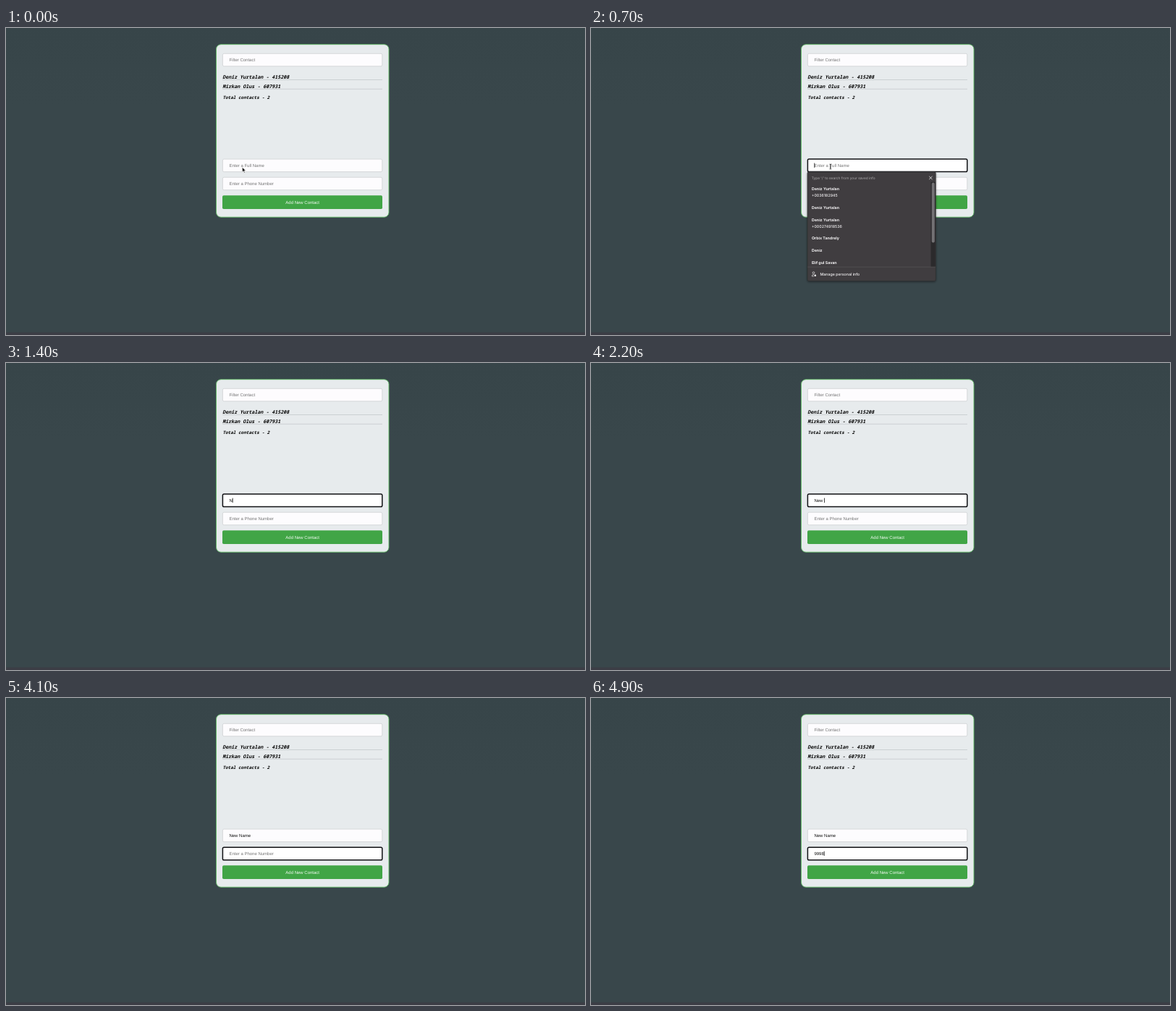
Animation, 800 px wide and 424 px high, one loop 5 s. Source, as an HTML page:

```html
<!DOCTYPE html>
<html lang="en">
<head>
<meta charset="utf-8">
<title>Contact form</title>
<style>
  html, body { margin: 0; width: 100%; height: 100%; overflow: hidden; background: #38464b; }
  svg { display: block; width: 100%; height: 100%; }
  text { text-rendering: geometricPrecision; white-space: pre; }
  .form { font: 6px "Liberation Sans", Arial, sans-serif; fill: #757575; }
  .typed { fill: #111; }
  .mono { font: italic 700 6.67px "Noto Sans Mono", "DejaVu Sans Mono", monospace; fill: #050505; }
  .total { font-size: 6px; }
  .ui { font: 500 5.3px Inter, sans-serif; fill: #f4f3f4; }
  .bold { font-weight: 700; }
  .hint { font-weight: 400; font-size: 4.8px; fill: #adabad; }
  .box { fill: #fdfcfe; stroke: #cbcdcf; stroke-width: .7; }
  .box.focus { fill: #fff; stroke: #101114; stroke-width: 1.5; }
</style>
</head>
<body>
<svg viewBox="0 0 800 424" preserveAspectRatio="none">
  <defs>
    <linearGradient id="back" x1="0" y1="0" x2="0" y2="1">
      <stop offset="0" stop-color="#374549"/>
      <stop offset=".25" stop-color="#39474b"/>
      <stop offset="1" stop-color="#39474b"/>
    </linearGradient>
    <filter id="shade" x="-10%" y="-10%" width="120%" height="125%">
      <feDropShadow dx="0" dy="1" stdDeviation="1.6" flood-color="#000" flood-opacity=".45"/>
    </filter>
  </defs>
  <rect width="800" height="424" fill="url(#back)"/>
  <rect y="420.5" width="800" height="3.5" fill="#3c3d45"/>
  <rect x="290.5" y="22.7" width="238.5" height="238.5" rx="6.5" fill="#e7ebed" stroke="#5fba64" stroke-width=".9"/>
  <g id="list"></g>
  <g id="fields"></g>
  <rect x="299" y="231.2" width="221" height="18.8" rx="1.8" fill="#41a546"/>
  <text class="form" x="409.7" y="242.5" text-anchor="middle" style="fill:#f4fbf4">Add New Contact</text>
  <rect id="caret" width=".8" height="6.4" fill="#111"/>
  <g id="popups"></g>
  <path id="arrow" d="M0 0V6.6L1.6 5.2L2.7 7.7L3.8 7.2L2.7 4.8H4.9Z" fill="#0b0b0b" stroke="#fff" stroke-width=".6" stroke-linejoin="round"/>
  <path id="beam" d="M-1.3 -3.3Q0 -3.3 0 -2.5Q0 -3.3 1.3 -3.3M0 -2.5V2.7M-1.3 3.5Q0 3.5 0 2.7Q0 3.5 1.3 3.5M-.7 1H.7" fill="none" stroke="#151515" stroke-width=".8"/>
</svg>
<script>
const $ = id => document.getElementById(id);

function add(parent, tag, attrs, content) {
  const el = document.createElementNS("http://www.w3.org/2000/svg", tag);
  for (const key in attrs) el.setAttribute(key, attrs[key]);
  if (content) el.textContent = content;
  parent.appendChild(el);
  return el;
}

const label = (parent, cls, x, y, content) => add(parent, "text", { class: cls, x, y }, content);
const show = (el, on) => el.setAttribute("visibility", on ? "visible" : "hidden");

function contact(y, content) {
  label($("list"), "mono", 299.3, y, content);
  add($("list"), "path", { d: `M299 ${y + 1.3}H520`, stroke: "#c0c5c8", "stroke-width": .7 });
}

function field(y, hint) {
  const box = add($("fields"), "rect", { class: "box", x: 299.4, y: y + .3, width: 220.4, height: 17.5, rx: 1.8 });
  const text = label($("fields"), "form", 308.4, y + 11.1, hint);
  return { y, hint, box, text };
}

// Rows are [baseline, text, bold]
function popup(top, height, rows, scrolls) {
  const g = add($("popups"), "g", {});
  const end = top + height;
  add(g, "rect", { x: 299, y: top, width: 177.3, height, rx: 2, fill: "#3f3d3f", stroke: "#29292b", "stroke-width": .5, filter: "url(#shade)" });
  label(g, "ui hint", 304.8, top + 10, "Type '/' to search from your saved info");
  add(g, "path", { d: `M467.2 ${top + 6.2}l4.3 4.3m0 -4.3l-4.3 4.3`, stroke: "#eee", "stroke-width": .8 });
  for (const [y, content, bold] of rows) label(g, bold ? "ui bold" : "ui", 304.9, y, content);
  if (scrolls) {
    add(g, "rect", { x: 469.6, y: top + 14, width: 6.2, height: end - top - 33.5, fill: "#2b2a2c" });
    add(g, "rect", { x: 470.8, y: top + 15, width: 4, height: 83, rx: 2, fill: "#737174" });
  }
  add(g, "path", { d: `M299.3 ${end - 19.3}H476`, stroke: "#5a585a", "stroke-width": .6 });
  const icon = add(g, "g", { transform: `translate(305 ${end - 13})`, fill: "none", stroke: "#e4e3e4", "stroke-width": .7 });
  add(icon, "circle", { cx: 2.5, cy: 1.7, r: 1.4 });
  add(icon, "path", { d: "M2.7 6.5H.4V5.5Q.4 4.2 2.9 4.2" });
  add(icon, "rect", { x: 3.5, y: 4.6, width: 2.5, height: 2, fill: "#e4e3e4", stroke: "none" });
  add(icon, "path", { d: "M4 4.7Q4.7 2.9 5.5 4.7" });
  label(g, "ui", 316.4, end - 7.7, "Manage personal info");
  return g;
}

const person = "Deniz Yurtalan", phoneA = "+0036182945", phoneB = "+000274918536";

contact(70.2, person + " - 415208");
contact(83, "Mirkan Olus - 607931");
label($("list"), "mono total", 299.4, 97.7, "Total contacts - 2");

field(35, "Filter Contact");
const nameField = field(180.8, "Enter a Full Name");
const phoneField = field(205.9, "Enter a Phone Number");

const namePopup = popup(198.6, 150.8, [
  [224.4, person, 1], [233.2, phoneA], [250, person, 1],
  [266.9, person, 1], [275.6, phoneB], [292.3, "Orbix Tandrely", 1],
  [309.1, "Deniz", 1], [325.9, "Elif gul Savan", 1]
], true);
const phonePopup = popup(223.7, 104.7, [
  [249.4, phoneA, 1], [258.3, person], [275, phoneB, 1],
  [283.9, person], [300.8, "00418263", 1]
]);

// Each entry: [start ms, value]
const nameSteps = [[0, ""], [1400, "N"], [1700, "Ne"], [2000, "New"], [2200, "New "],
  [2700, "New N"], [2800, "New Na"], [3000, "New Nam"], [3100, "New Name"]];
const phoneSteps = [[0, ""], [4400, "9"], [4600, "99"], [4700, "999"], [4900, "9998"]];
const mouseSteps = [[0, [326.4, 192.3]], [100, [328, 193.6]], [200, [329.7, 192.3]], [300, [330.9, 191.4]]];
const focusSteps = [[0, null], [700, nameField], [3600, phoneField]];

const at = (steps, t) => steps.filter(s => s[0] <= t).pop();

function fill(f, value, focused) {
  f.text.textContent = value || f.hint;
  f.text.setAttribute("class", value ? "form typed" : "form");
  f.box.setAttribute("class", focused ? "box focus" : "box");
}

function draw(t) {
  const [focusTime, focus] = at(focusSteps, t);
  const [nameTime, name] = at(nameSteps, t);
  const [phoneTime, phone] = at(phoneSteps, t);
  fill(nameField, name, focus === nameField);
  fill(phoneField, phone, focus === phoneField);

  // The caret blinks every half second, restarting on each key
  const since = t - Math.max(focusTime, nameTime, phoneTime);
  show($("caret"), focus && since % 1000 < 500);
  if (focus) {
    const value = focus === nameField ? name : phone;
    const width = value ? focus.text.getComputedTextLength() : 0;
    $("caret").setAttribute("x", 308.4 + width);
    $("caret").setAttribute("y", focus.y + 5.7);
  }

  show(namePopup, t >= 700 && t < 1400);
  show(phonePopup, t >= 4400 && t < 4600);

  const [x, y] = at(mouseSteps, t)[1];
  for (const id of ["arrow", "beam"]) $(id).setAttribute("transform", `translate(${x} ${y})`);
  show($("arrow"), t < 100);
  show($("beam"), t >= 100 && t < 1400);
}

const start = performance.now();
function tick(now) {
  draw(Math.max(0, now - start) % 5000);
  requestAnimationFrame(tick);
}
draw(0);
requestAnimationFrame(tick);
</script>
</body>
</html>
```
